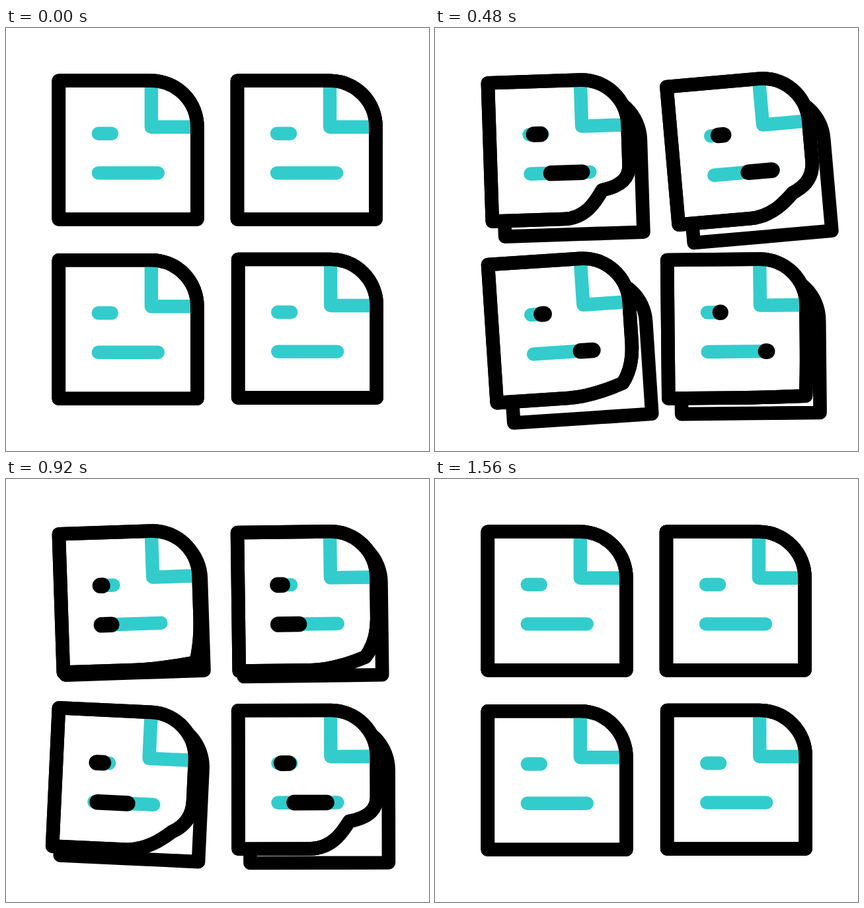
An HTML page that plays this animation: 640x640 px, repeating every 2000 ms.

```html
<!DOCTYPE html>
<html lang="en">
<head>
<meta charset="utf-8">
<title>Four notes</title>
<style>
  html, body { margin: 0; width: 100%; height: 100%; overflow: hidden; background: #fff; }
  svg { display: block; width: 100vw; height: 100vh; }
  path { fill: none; stroke: #000; stroke-width: 20.6; stroke-linecap: round; stroke-linejoin: round; }
  .page { fill: #fff; }
  .teal { stroke: #33cccc; stroke-width: 20.4; }
  .ink { stroke-width: 23.6; }
</style>
</head>
<body>
<svg id="stage" viewBox="0 0 640 640"></svg>
<script>
const LOOP = 2000, STEP = 40, LENGTH = 1160, SIZE = 209.5;
const notes = [
  { x: 79.8, y: 79.8, delay: 0 },
  { x: 350, y: 79.8, delay: 120 },
  { x: 79.8, y: 351.2, delay: 240 },
  { x: 351.2, y: 350, delay: 400 }
];
const lines = [{ x: 60, y: 80, w: 20 }, { x: 60, y: 139.6, w: 90 }];
const swing = [[0, 0], [360, -5], [640, 3], [880, -2], [LENGTH, 0]];
const slide = [[0, 0], [120, 31.4], [LENGTH, 0]];
const inkStart = [[0, 1], [800, 0]];
const inkEnd = [[270, 1], [LENGTH, 0]];

const stage = document.getElementById('stage');

function add(parent, tag, attrs = {}) {
  const el = document.createElementNS('http://www.w3.org/2000/svg', tag);
  for (const key in attrs) el.setAttribute(key, attrs[key]);
  return parent.appendChild(el);
}

const clamp = u => Math.min(1, Math.max(0, u));
const sine = u => 0.5 - 0.5 * Math.cos(Math.PI * clamp(u));
const mix = (a, b, u) => a + (b - a) * u;

// Value of a keyframed track with sine easing between keys
function track(keys, t) {
  for (let i = 1; i < keys.length; i++) {
    const [t0, v0] = keys[i - 1], [t1, v1] = keys[i];
    if (t <= t1) return mix(v0, v1, sine((t - t0) / (t1 - t0)));
  }
  return keys[keys.length - 1][1];
}

function curlAt(t) {
  if (t < 500) return sine(Math.pow(clamp(t / 500), 1.1));
  return 1 - sine(Math.pow(clamp((t - 500) / 660), 0.79));
}

// Page outline; c lifts the lower right corner
function outline(c) {
  const k = SIZE - 42 * c;
  const right = `C${SIZE} ${mix(158, 150, c)} ${k + 29 * c} ${k - mix(24, 5, c)} ${k} ${k}`;
  const bottom = `C${k - mix(24, 10, c)} ${k + 16 * c} 142 ${SIZE} 108 ${SIZE}`;
  return `M0 0H140A69.5 69.5 0 0 1 ${SIZE} 70V131${right}${bottom}H0Z`;
}

const stroke = (l, a, b) => `M${l.x + l.w * a} ${l.y}H${l.x + l.w * b + 0.01}`;

for (const n of notes) {
  const g = add(stage, 'g', { transform: `translate(${n.x} ${n.y})` });
  n.back = add(g, 'path', { class: 'page', d: outline(0) });
  n.front = add(g, 'g');
  n.page = add(n.front, 'path', { class: 'page' });
  add(n.front, 'path', { class: 'teal', d: 'M140 0V70H209' });
  n.edge = add(n.front, 'path');
  n.ink = lines.map(l => {
    add(n.front, 'path', { class: 'teal', d: stroke(l, 0, 1) });
    return add(n.front, 'path', { class: 'ink' });
  });
}

function draw(time) {
  const now = Math.floor((time % LOOP + 0.5) / STEP) * STEP;
  for (const n of notes) {
    const t = now - n.delay;
    const turn = `rotate(${track(swing, t)} ${SIZE / 2} 0)`;
    const d = track(slide, t);
    const shape = outline(curlAt(t));
    n.front.setAttribute('transform', turn);
    n.back.setAttribute('transform', `translate(${d * 0.84} ${d}) ${turn}`);
    n.page.setAttribute('d', shape);
    n.edge.setAttribute('d', shape);
    const a = track(inkStart, t), b = track(inkEnd, t);
    n.ink.forEach((el, i) => {
      el.setAttribute('d', stroke(lines[i], a, b));
      el.setAttribute('visibility', t > 0 && t < LENGTH ? 'visible' : 'hidden');
    });
  }
}

function tick(time) {
  draw(time);
  requestAnimationFrame(tick);
}
draw(0);
requestAnimationFrame(tick);
</script>
</body>
</html>
```
